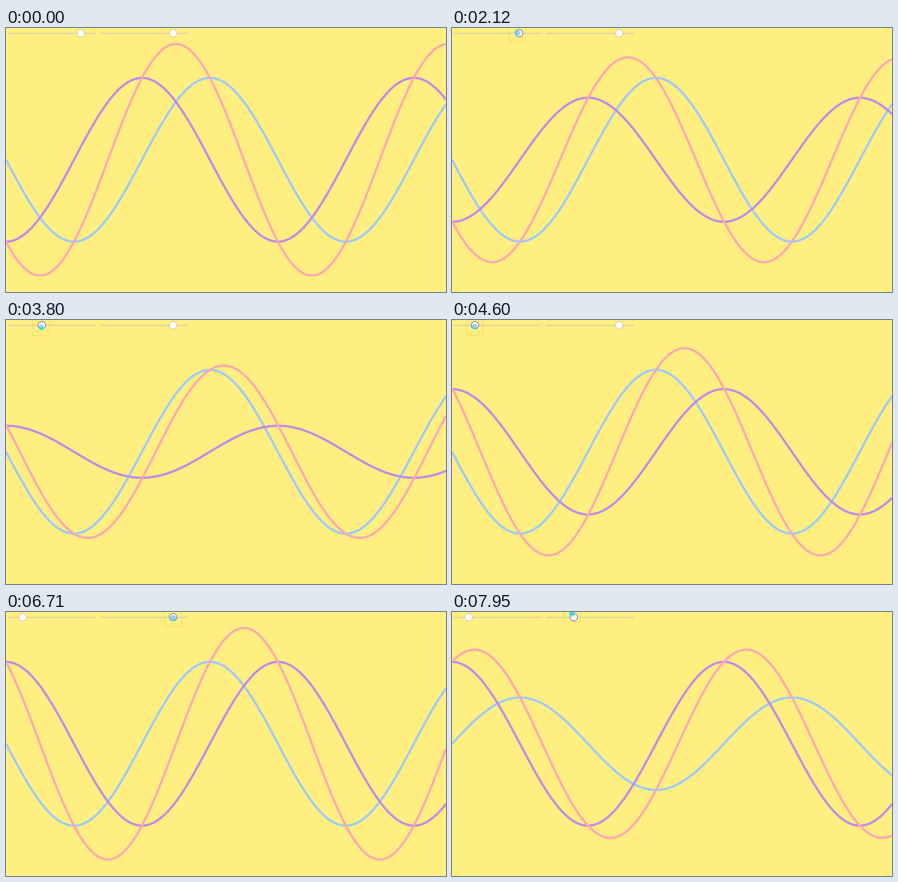
Write an HTML page with a canvas that moves like this. It is 967x579 px and loops after 7990 ms.

```html
<!DOCTYPE html>
<html lang="en">
<head>
<meta charset="utf-8">
<title>Adding two waves</title>
<style>
  html, body { margin: 0; width: 100%; height: 100%; overflow: hidden; background: #ffee80; }
  canvas { display: block; }
</style>
</head>
<body>
<canvas id="stage" width="967" height="579"></canvas>
<script>
const ctx = document.getElementById('stage').getContext('2d');
const W = 967, H = 579, MID = 289, PERIOD = 597.5, MAX = 179.5;
const LOOP = 7990, STEP = 40, GAIN = 2.82, KNOB_Y = 11.5;
const FADE = 400, DRAG_1 = 710, DROP = 5340, DRAG_2 = 6350;
const TAU = Math.PI * 2;

// Key points [time, value] of both drags and of the pointer
const cosDrag = [[1110, MAX], [2120, 136], [2920, 60], [3800, -57], [4700, -146], [5160, -MAX]];
const sinDrag = [[6750, MAX], [7110, 98], [7310, 19.5], [7350, -3], [7990, -102]];
const pointerDx = [[1110, 0], [2120, -4], [2920, -1.5], [6750, 0], [7310, 2], [7950, -3.5]];
const pointerY = [[1110, 12.5], [2120, 11], [3800, 16], [5160, 13.5], [6750, 13.5], [7310, 6], [7950, 4]];

const clamp = v => Math.min(1, Math.max(0, v));
const secant = (k, i) => (k[i + 1][1] - k[i][1]) / (k[i + 1][0] - k[i][0]);

function slope(k, i) {
  if (i === 0 || i === k.length - 1) return 0;
  const a = secant(k, i - 1), b = secant(k, i);
  return a * b <= 0 ? 0 : 2 * a * b / (a + b);
}

// Monotone cubic through the key points
function at(k, t) {
  const last = k.length - 1;
  if (t <= k[0][0]) return k[0][1];
  if (t >= k[last][0]) return k[last][1];
  let i = 0;
  while (t > k[i + 1][0]) i++;
  const h = k[i + 1][0] - k[i][0], u = (t - k[i][0]) / h, v = 1 - u;
  return k[i][1] * (1 + 2 * u) * v * v + k[i + 1][1] * (1 + 2 * v) * u * u
    + h * u * v * (slope(k, i) * v - slope(k, i + 1) * u);
}

function presence(t) {
  if (t >= DRAG_2) return clamp((t - DRAG_2) / FADE);
  if (t >= DROP) return clamp(1 - (t - DROP) / FADE);
  return clamp((t - DRAG_1) / FADE);
}

function wave(color, a, b) {
  ctx.beginPath();
  for (let x = 0; x <= W; x++) {
    const p = TAU * x / PERIOD;
    ctx.lineTo(x, MID + a * Math.sin(p) + b * Math.cos(p));
  }
  ctx.strokeStyle = color;
  ctx.lineWidth = 5;
  ctx.lineJoin = 'round';
  ctx.stroke();
}

function circle(x, y, r) {
  ctx.beginPath();
  ctx.arc(x, y, r, 0, TAU);
}

function fillCircle(x, y, r, color) {
  circle(x, y, r);
  ctx.fillStyle = color;
  ctx.fill();
}

function rim(x, color) {
  circle(x, KNOB_Y, 8.2);
  ctx.lineWidth = 1;
  ctx.strokeStyle = color;
  ctx.stroke();
}

function slider(left, x) {
  ctx.fillStyle = '#cfc4bc';
  ctx.fillRect(left, 10.75, 193, 1.75);
  fillCircle(x, KNOB_Y, 8.2, '#fff');
  rim(x, '#b5ae9e');
}

function pointer(x, y, knob, p) {
  if (p <= 0) return;
  const r = 6 + 6.5 * (1 - p);
  ctx.save();
  ctx.globalAlpha = p;
  ctx.beginPath();
  ctx.roundRect(x - 18.5, y - 18.5, 37, 37, 3);
  ctx.lineWidth = 3;
  ctx.strokeStyle = 'rgba(170, 130, 0, 0.09)';
  ctx.stroke();
  rim(knob, '#2433b8');
  fillCircle(x, y, r, '#3fd3ea');
  // paler where it lies over the knob
  circle(knob, KNOB_Y, 6);
  ctx.clip();
  fillCircle(x, y, r, '#a6caf6');
  ctx.restore();
}

function draw(time) {
  const start = time >= DRAG_2 ? DRAG_2 : time >= DROP ? DROP : 0;
  const t = start + STEP * Math.floor((time - start) / STEP);
  // the parts react in turn: knob first, then the sum, then the single waves
  const knob1 = 100.3 + at(cosDrag, t + STEP) / GAIN;
  const knob2 = 303.7 + at(sinDrag, t + STEP) / GAIN;
  const mid = t + STEP / 2;

  ctx.fillStyle = '#ffee80';
  ctx.fillRect(0, 0, W, H);
  wave('#9ecbfd', at(sinDrag, t), 0);
  wave('#c08de8', 0, at(cosDrag, t));
  wave('#ffa8b2', at(sinDrag, mid), at(cosDrag, mid));
  slider(4, knob1);
  slider(207, knob2);
  const knob = t >= DRAG_2 ? knob2 : knob1;
  pointer(knob + at(pointerDx, t), at(pointerY, t), knob, presence(t));
}

const begin = performance.now();
function tick() {
  draw((performance.now() - begin) % LOOP);
  requestAnimationFrame(tick);
}
tick();
</script>
</body>
</html>
```
